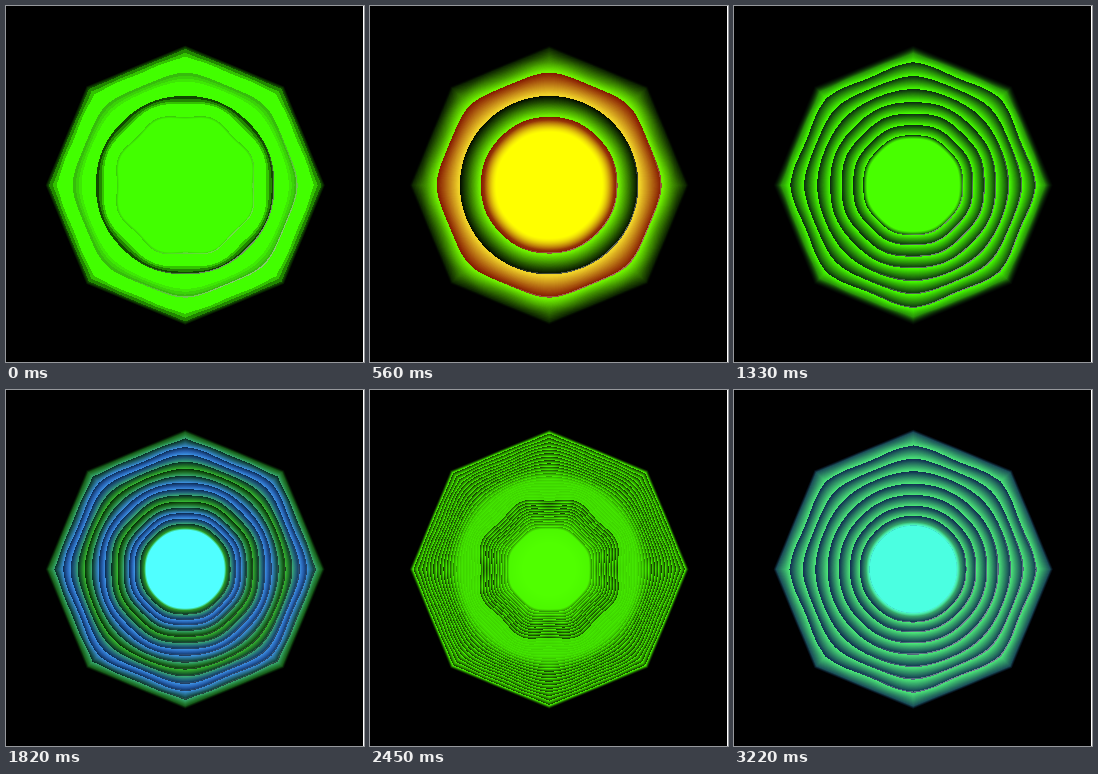
These frames come from a looping animation (358 px wide and 356 px high, 3290 ms). An HTML page with a canvas:

```html
<!DOCTYPE html>
<html lang="en">
<head>
<meta charset="utf-8">
<title>Octagon rings</title>
<style>
html, body { margin: 0; width: 100%; height: 100%; overflow: hidden; background: #000; }
canvas { display: block; }
</style>
</head>
<body>
<canvas id="stage" width="358" height="356"></canvas>
<script>
const W = 358, H = 356, CX = 178.7, CY = 178.7, RIM = 140;
const STEP = 70, STEPS = 47;
const ctx = document.getElementById('stage').getContext('2d');
const img = ctx.createImageData(W, H);
const px = img.data;

const clamp = v => Math.max(0, Math.min(1, v));
const mix = (a, b, k) => a + (b - a) * k;
const smooth = (a, b, v) => { const k = clamp((v - a) / (b - a)); return k * k * (3 - 2 * k); };
const rgb = hex => [0, 2, 4].map(i => parseInt(hex.substr(i, 2), 16));

// cols: even low, even high, odd low, odd high, centre
const key = (step, cycles, cols, opt) => ({
  step, octave: Math.log2(cycles), group: 1, blend: 0, gain: 1, levels: 64,
  flat: 0.3, core: 44, soft: 6, calm: 0, tint: 0, fade: 3, shine: 0.5,
  ...opt, cols: cols.split(' ').flatMap(rgb)
});

const keys = [
  key(0, 4.55, '000c00 42ff00 32a510 42ff00 42ff00',
    { gain: 2, levels: 4, flat: 0.8, core: 66, soft: 3 }),
  key(8, 4.55, '000800 6ef000 821400 f0d228 ffff00',
    { gain: 1.05, flat: 0.1, core: 53, soft: 12, shine: 0.4 }),
  key(19, 8, '0a2810 46ff00 0a2810 46ff00 48ff00',
    { core: 46, soft: 4, fade: 8 }),
  key(26, 15, '052c05 34b432 0c2a5a 3c8cf0 50ffff',
    { group: 2.5, blend: 1, core: 39, soft: 2, shine: 0.15 }),
  key(35, 32, '123c00 46f000 123c00 46f000 50ff00',
    { flat: 0.9, core: 26, soft: 30, calm: 1, shine: 0 }),
  key(41, 64, '0a1478 1414c3 0a1478 1414c3 3282f0',
    { core: 39, soft: 2, tint: 0.85, shine: 0 }),
  key(46, 8.4, '0e2a50 4be678 0e2a50 4be678 4bffe1',
    { flat: 0.1, core: 43, soft: 4 })
];

function pose(step) {
  let i = 0;
  while (i < keys.length - 2 && step >= keys[i + 1].step) i++;
  const a = keys[i], b = keys[i + 1], k = (step - a.step) / (b.step - a.step);
  const p = {};
  for (const n in a) {
    p[n] = n === 'cols' ? a.cols.map((v, j) => mix(v, b.cols[j], k)) : mix(a[n], b[n], k);
  }
  p.cycles = 2 ** p.octave;
  return p;
}

// Height of the cone at a given radius
const slope = [[RIM, 0], [123, 0.125], [109, 0.25], [83, 0.5], [60, 0.75], [40, 1]];
function height(d) {
  for (let i = 1; i < slope.length; i++) {
    const [r0, s0] = slope[i - 1], [r1, s1] = slope[i];
    if (d >= r1) return mix(s0, s1, (r0 - d) / (r0 - r1));
  }
  return 0.9999;
}

// Sharp octagon at the rim, rounding to a circle, with flat sides again further in
const outer = new Float32Array(W * H);
const inner = new Float32Array(W * H);
const light = new Float32Array(W * H);
const EIGHTH = Math.PI / 4;
for (let y = 0, i = 0; y < H; y++) {
  for (let x = 0; x < W; x++, i++) {
    const dx = x - CX, dy = y - CY, r = Math.hypot(dx, dy);
    const a = Math.atan2(dy, dx) + 2 * Math.PI;
    const wave = 0.5 - 0.5 * Math.cos(8 * a);
    const sharp = Math.cos(a % EIGHTH - EIGHTH / 2) / Math.cos(EIGHTH / 2) - 1;
    const bulge = mix(0.082 * wave, sharp, smooth(118, 129, r));
    outer[i] = r * (1 + bulge * smooth(85, 132, r));
    inner[i] = -0.07 * r * wave * smooth(30, 55, r) * (1 - smooth(76, 94, r));
    light[i] = clamp((dx + dy) / (r + 1) - 0.3);
  }
}

function draw(step) {
  const p = pose(step), c = p.cols, teal = [36, 145, 150];
  for (let i = 0; i < W * H; i++) {
    const o = i * 4;
    const d = outer[i] + inner[i] * p.flat;
    px[o + 3] = 255;
    if (i % W === W - 1) {
      px[o] = px[o + 1] = px[o + 2] = 255;
      continue;
    }
    if (d >= RIM) {
      px[o] = px[o + 1] = px[o + 2] = 0;
      continue;
    }
    const s = height(d), turn = s * p.cycles, n = Math.floor(turn), f = turn - n;
    let v = clamp(f * p.gain);
    v = Math.ceil(v * p.levels) / p.levels;
    const quiet = d > 68.5 ? p.calm * (1 - smooth(86, 105, d)) : 0;
    v = mix(v, 0.95, quiet * 0.88);
    const beat = turn / p.group;
    const odd = mix(Math.floor(beat) % 2, 0.5 - 0.5 * Math.cos(beat * Math.PI), p.blend);
    const core = clamp((p.core + p.soft - d) / p.soft);
    const edge = clamp((RIM - d) / p.fade);
    const glint = n > 0 && f < p.cycles / 85 ? p.shine * light[i] : 0;
    for (let j = 0; j < 3; j++) {
      let q = mix(mix(c[j], c[6 + j], odd), mix(c[3 + j], c[9 + j], odd), v);
      q = mix(q, teal[j], p.tint * s * s);
      q = mix(q, 215, glint);
      px[o + j] = mix(q * edge, c[12 + j], core);
    }
  }
  ctx.putImageData(img, 0, 0);
}

let last = -1;
const start = performance.now();
function tick(now) {
  const step = Math.floor(Math.max(0, now - start) / STEP) % STEPS;
  if (step !== last) draw(last = step);
  requestAnimationFrame(tick);
}
draw(last = 0);
requestAnimationFrame(tick);
</script>
</body>
</html>
```
